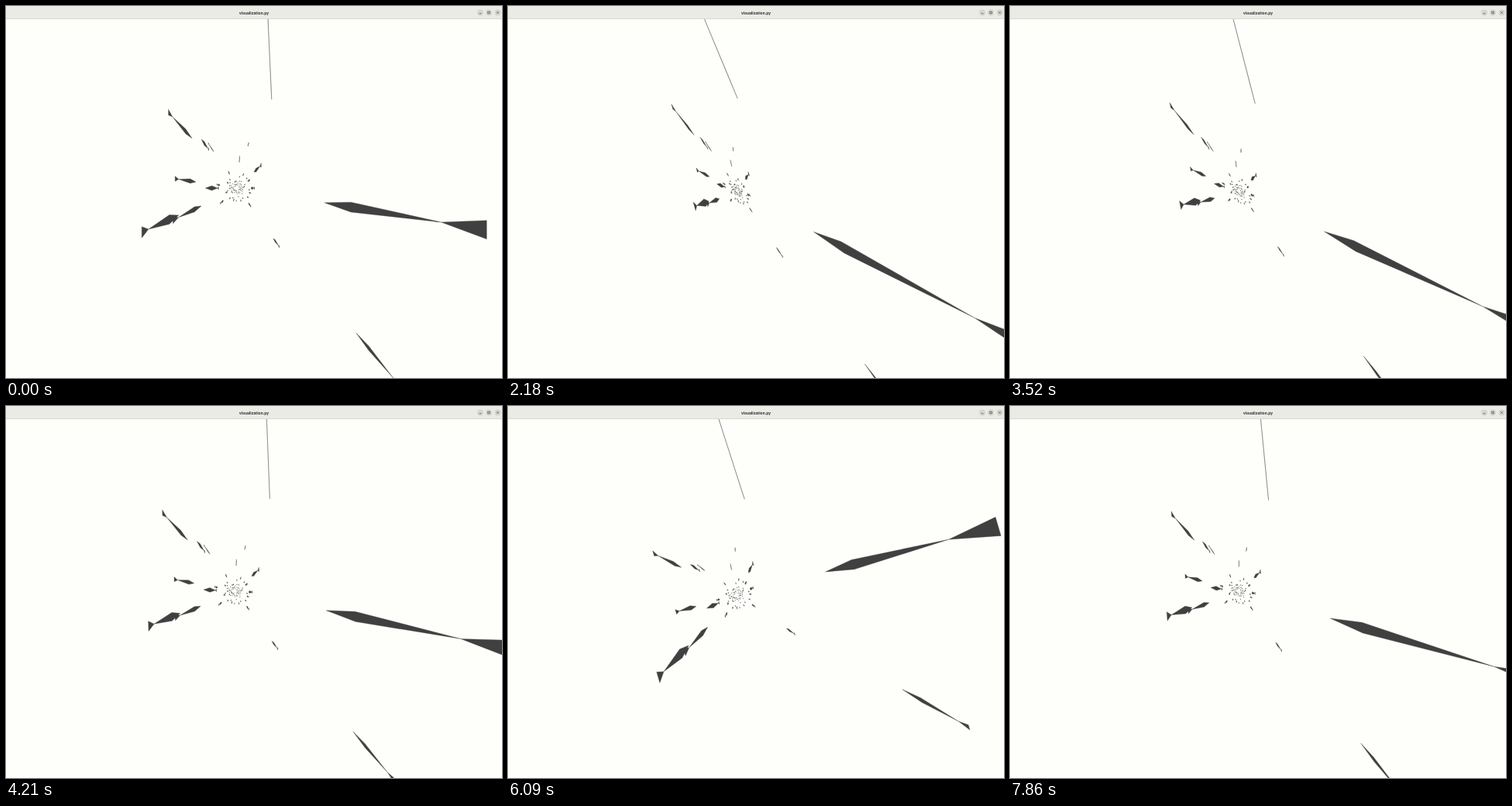
Animation, 640 px wide and 480 px high, one loop 8 s. Source, as an HTML page:

```html
<!DOCTYPE html>
<html lang="en">
<head>
<meta charset="utf-8">
<title>visualization.py</title>
<style>
  html, body { margin: 0; width: 100%; height: 100%; overflow: hidden; background: #fefefb; }
  svg { display: block; width: 100vw; height: 100vh; }
  text { font: 700 5.4px Roboto, "Open Sans", sans-serif; fill: #3a3a3a; text-anchor: middle; }
</style>
</head>
<body>
<svg viewBox="0 0 640 480">
  <rect width="640" height="480" fill="#fefefb"/>
  <path id="school" fill="#404040" stroke="#404040" stroke-width=".35" stroke-linejoin="round"/>
  <rect width="640" height="16.5" fill="#ebebe5"/>
  <rect y="16" width="640" height="1" fill="#d9d9d2"/>
  <text x="320" y="10.6">visualization.py</text>
  <g fill="#d6d6d0">
    <circle cx="612" cy="8.5" r="4"/><circle cx="623" cy="8.5" r="4"/><circle cx="634.5" cy="8.5" r="4"/>
  </g>
  <path d="M610.5 9.8h3M621.7 7.2h2.6v2.6h-2.6zM633.2 7.2l2.6 2.6m0-2.6l-2.6 2.6" fill="none" stroke="#555" stroke-width=".8"/>
</svg>
<script>
const LOOP = 8000;

// Camera poses: time, vanishing point, 2x2 turn of the school, depth gained per 100 units of x and y
const POSES = [
  [0,    298, 235, 1, 0, 0, 1, 0, 0],
  [1110, 296, 238, .77, .16, .01, 1.02, -.14, .05],
  [2880, 296, 239, .67, .3, .35, .9, -.16, .12],
  [4210, 295, 239, 1, .03, .05, .97, -.045, .06],
  [5210, 311, 243, .75, .15, -.27, 1.06, .125, .03],
  [6090, 295, 244, .95, .28, -.42, .95, -.01, -.03],
  [7860, 295, 239, .92, .07, .12, .93, -.11, .08]
];

// The picture rests during these spans.
const HOLDS = [[0, 200], [680, 850], [1610, 1710], [1960, 2100], [2880, 2970], [3730, 3900],
  [4630, 4730], [5470, 5670], [6440, 6570], [7300, 7400], [7860, LOOP]];

// A fish is one unit long in depth; z is the depth of its nose.
const fish = (x, y, z, height, dir = 1, lean = 0) => ({ x, y, z, height, dir, lean });
const school = [
  fish(174, 29, 1.54, 13),
  fish(577, 701, 3.75, 17),
  fish(-168, -186, 2.9, 14),
  fish(-158, -24, 2.98, 13),
  fish(-104, 52, 2.26, 11),
  fish(-194, 90, 2.58, 23),
  fish(-57, 0, 1.4, 9, -1),
  fish(-178, -244, 3.88, 18, -1),
  fish(-159, -249, 5.3, 6),
  fish(338, 468, 7.2, 20),
  fish(196, -756, 14, 24),
  fish(75, -71, 3.4, 13),
  fish(94, -240, 2.1, 2, 1, -50)
];

// The rest of the school thins out towards the vanishing point.
let seed = 11;
const rand = () => (seed = seed * 16807 % 2147483647) / 2147483647;
for (let i = 0; i < 85; i++) {
  const angle = i * 2.4, r = 90 + 120 * rand();
  school.push(fish(r * Math.cos(angle), r * Math.sin(angle), 5 + .4 * i, 12 + 6 * rand()));
}

// Monotone cubic through the poses
function slope(i, k) {
  if (i === 0 || i === POSES.length - 1) return 0;
  const [p, q, r] = POSES.slice(i - 1, i + 2);
  const a = (q[k] - p[k]) / (q[0] - p[0]), b = (r[k] - q[k]) / (r[0] - q[0]);
  return a * b > 0 ? 2 * a * b / (a + b) : 0;
}

function poseAt(t) {
  let i = 0;
  while (i < POSES.length - 2 && t >= POSES[i + 1][0]) i++;
  const from = POSES[i], to = POSES[i + 1], span = to[0] - from[0];
  const s = Math.min(1, (t - from[0]) / span), q = 1 - s;
  return from.map((v, k) => v * (1 + 2 * s) * q * q + to[k] * s * s * (3 - 2 * s) +
    span * s * q * (slope(i, k) * q - slope(i + 1, k) * s));
}

function outline(f, [, vx, vy, a, b, c, d, e, g]) {
  const x = a * f.x + b * f.y, y = c * f.x + d * f.y;
  const z = f.z + (e * f.x + g * f.y) / 100;
  // Project the point u along the body, raised by h
  const at = (u, h = 0) => {
    const depth = z - f.dir * u;
    const px = vx + (x + f.lean * u - b * h) / depth, py = vy + (y - d * h) / depth;
    return px.toFixed(2) + " " + py.toFixed(2);
  };
  const mid = f.height * .58, tail = f.height / 2, joint = at(.88);
  return `M${at(0)}L${at(.357, mid)}L${joint}L${at(.357, -mid)}Z` +
    `M${joint}L${at(1, tail)}L${at(1, -tail)}Z`;
}

const path = document.getElementById("school");

function draw(time) {
  const hold = HOLDS.find(([a, b]) => time >= a && time < b);
  const pose = poseAt(hold ? hold[0] : time);
  path.setAttribute("d", school.map(f => outline(f, pose)).join(""));
}

const start = performance.now();
function tick() {
  draw((performance.now() - start) % LOOP);
  requestAnimationFrame(tick);
}
tick();
</script>
</body>
</html>
```
